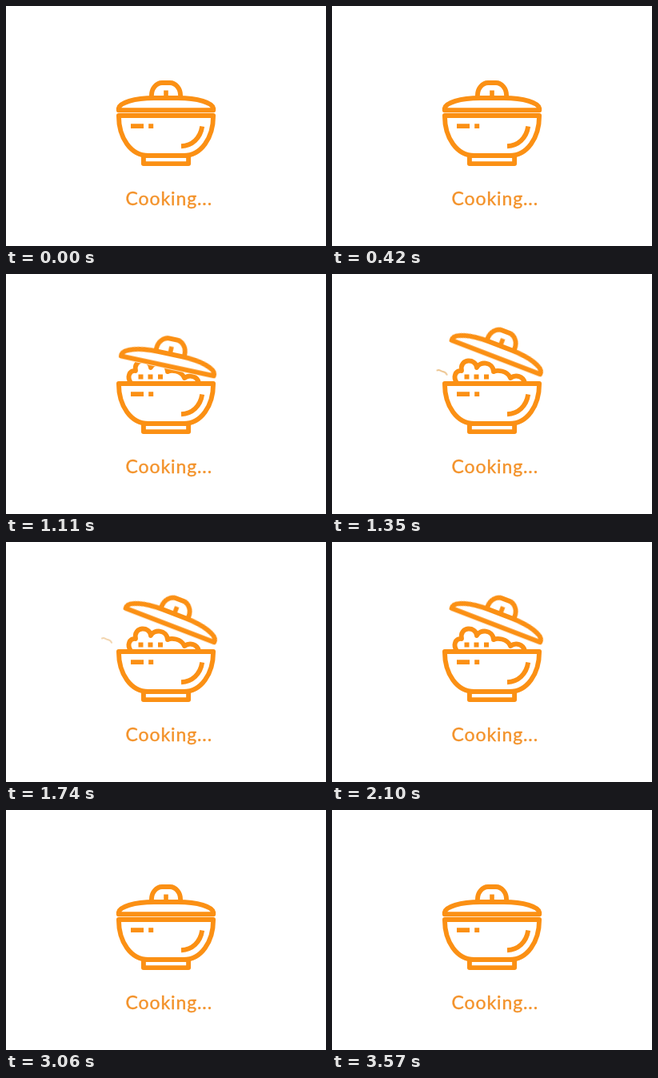
Write an HTML page that moves like this. It is 400 by 300 pixels and loops after 3.6 s.

```html
<!DOCTYPE html>
<html lang="en">
<head>
<meta charset="utf-8">
<title>Cooking</title>
<style>
  html, body { margin: 0; width: 100%; height: 100%; overflow: hidden; background: #fff; }
  svg { display: block; width: 100%; height: 100%; }
  .line { fill: #fff; stroke: #fb9014; stroke-width: 5.9; stroke-linejoin: round; }
  .open { fill: none; }
  .solid { fill: #fb9014; }
  .cover { fill: #fff; }
  .label {
    font: 23px Lato, "Open Sans", sans-serif; letter-spacing: .9px;
    fill: #f3922a; stroke: #f3922a; stroke-width: .4;
  }

  .lid { transform-origin: 262px 131px; animation: lift 3600ms ease-in-out infinite; }
  .steam {
    fill: none; stroke: #e9b878; stroke-width: 2; stroke-linecap: round;
    animation: drift 3600ms linear infinite, fade 3600ms linear infinite;
  }

  @keyframes lift {
    0%, 25.42%, 74%, 100% { transform: translate(0, 0) rotate(0deg); }
    35.42%, 64% { transform: translate(.5px, -4px) rotate(21deg); }
  }
  @keyframes drift {
    0%, 33.33% { transform: translateX(4px); }
    55%, 100% { transform: translateX(-19px); }
  }
  @keyframes fade {
    0%, 33.33%, 55%, 100% { opacity: 0; }
    37.5%, 46% { opacity: .8; }
  }
</style>
</head>
<body>
<svg viewBox="0 0 400 300">
  <g class="food">
    <path class="line" d="M156 136C151 129 154 120 162 121C159 105 180 105 181 117C184 109 201 109 202 122C206 120 219 120 223 130C230 125 239 128 241 136"/>
    <path class="solid" d="M165.500 125.500h6v6h-6zM177.500 125.500h6v6h-6zM190 125.500h6v6h-6z"/>
  </g>

  <g class="lid">
    <!-- hides the food above the lid's lower edge -->
    <rect class="cover" x="130" y="60" width="132" height="74"/>
    <path class="line" d="M181.900 114V112C181.900 103 188 96 195 96H205C212 96 218.100 103 218.100 112V114"/>
    <path class="solid" d="M197.200 105.500h5.600v8h-5.600z"/>
    <path class="line" d="M140.800 130.200V128C142 121 160 115 185 115H215C240 115 258 121 259.200 128V130.200Z"/>
  </g>

  <g class="bowl">
    <path class="line" d="M171.900 187H228.100V197.100H171.900Z"/>
    <path class="line" d="M140.900 137H259.100C259.100 165 244 187 222 187H178C156 187 140.900 165 140.900 137Z"/>
    <path class="solid" d="M156 147.200h16v5.800h-16zM178.200 147.200h6v5.800h-6z"/>
    <path class="line open" d="M245.200 150.500C243 165 233 174.500 219 175.200"/>
  </g>

  <path class="steam" d="M132 120.500C135 119 136 121.500 139 122C142 122.500 143 123.500 144 125.800"/>
  <text class="label" x="149.500" y="249">Cooking...</text>
</svg>
</body>
</html>
```
